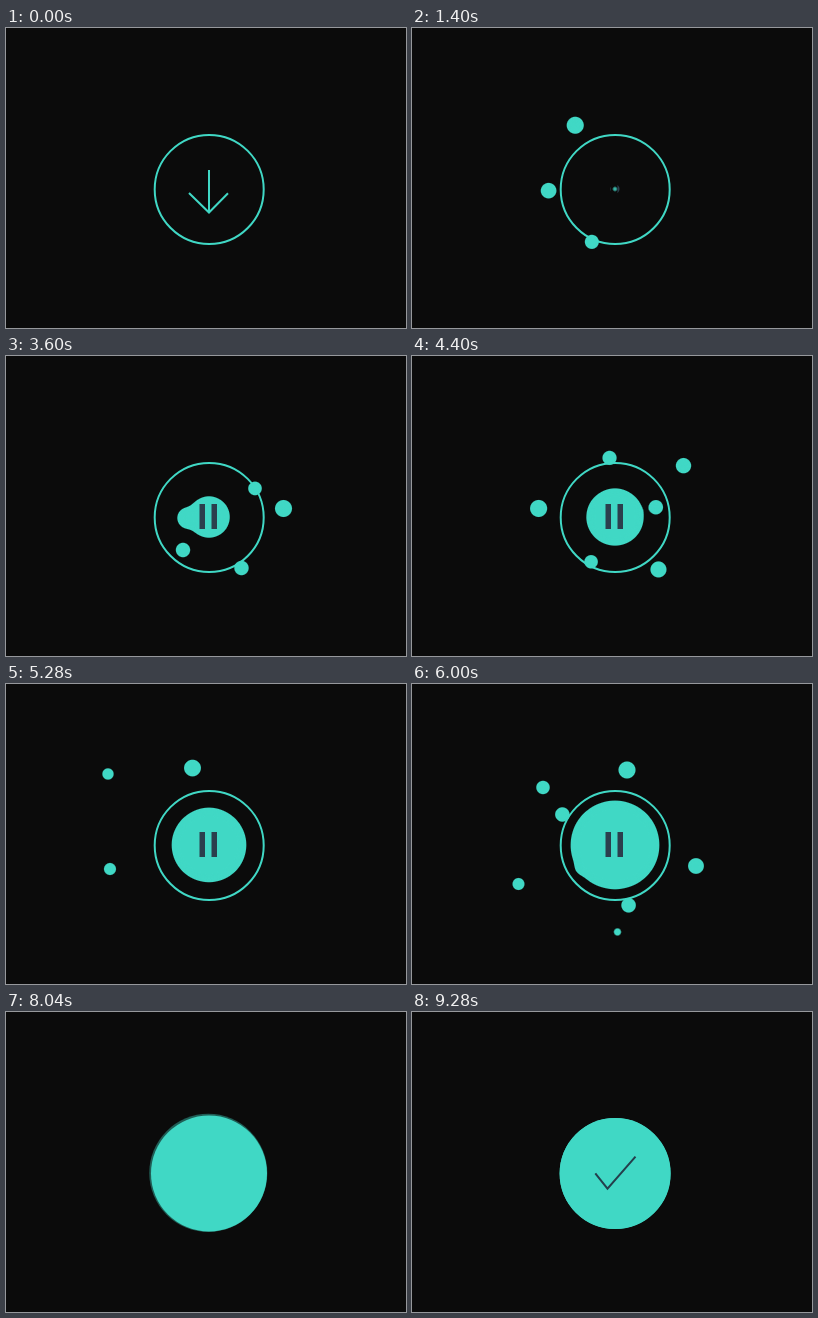
These frames come from a looping animation (400x300 px, 9.6 s). An HTML page:

```html
<!DOCTYPE html>
<html lang="en">
<head>
<meta charset="utf-8">
<title>Download</title>
<style>
  html, body { margin: 0; width: 100%; height: 100%; overflow: hidden; background: #0b0b0b; }
  svg { display: block; width: 100vw; height: 100vh; }
</style>
</head>
<body>
<svg viewBox="0 0 400 300">
  <defs>
    <filter id="goo" filterUnits="userSpaceOnUse" x="0" y="0" width="400" height="300" color-interpolation-filters="sRGB">
      <feGaussianBlur stdDeviation="3.5"/>
      <feColorMatrix values="1 0 0 0 0  0 1 0 0 0  0 0 1 0 0  0 0 0 9 -3.6"/>
    </filter>
    <clipPath id="inside"><circle id="mask" cx="203" cy="161"/></clipPath>
  </defs>
  <circle id="halo" cx="202.3" cy="160.9" fill="#40d8c5"/>
  <circle cx="203.2" cy="161.4" r="54.5" fill="none" stroke="#40d8c5" stroke-width="2"/>
  <path id="arrow" d="M203 142V184.5M183 165L203 184.5L222 165.3" fill="none" stroke="#40d8c5" stroke-width="2"/>
  <circle id="tap" cx="227.5" cy="151.5" fill="#fff"/>
  <g id="drops" fill="#40d8c5" filter="url(#goo)"><circle id="blob" cx="203" cy="161"/></g>
  <circle id="disc" cx="203" cy="161.5" fill="#40d8c5"/>
  <g clip-path="url(#inside)">
    <path id="bars" d="M193.5 148h5.5v25h-5.5zM205.5 148h5.5v25h-5.5z" fill="#2b3f4d"/>
  </g>
  <path id="check" d="M183.3 161.3L195.5 176.7L223.5 144.7" pathLength="1" stroke-dasharray="1 2" fill="none" stroke="#243f4c" stroke-width="2"/>
</svg>
<script>
const LOOP = 9600, STEP = 40, CX = 203, CY = 161, FULL = 55.5;
const SPEED = 0.087;   // pixels per ms towards the centre
const GROW = 14;       // path length spent growing at the birth point
const BIRTH = 86;      // least distance at which a drop is born

const el = id => document.getElementById(id);
const set = (node, attrs) => { for (const k in attrs) node.setAttribute(k, attrs[k]); };
const show = (node, on) => { node.style.display = on ? "" : "none"; };
const clamp = v => Math.max(0, Math.min(1, v));
const part = (t, from, to) => clamp((t - from) / (to - from));
const bell = (x, mid, width) => Math.exp(-(((x - mid) / width) ** 2));

// Drops pulse on the way in and swell just before they merge.
const dropSize = d => 7.8 - 0.011 * d + 2 * bell(d, 76, 14) + 3.5 * bell(d, 24, 12);

const drops = [];

// A drop that passes (x, y) at the given time, spiralling inwards.
function addDrop(time, x, y) {
  const node = document.createElementNS("http://www.w3.org/2000/svg", "circle");
  el("drops").append(node);
  const dist = Math.hypot(x - CX, y - CY), angle = Math.atan2(y - CY, x - CX);
  const birth = Math.max(BIRTH, dist);
  const curl = (0.25 - 0.18 * Math.sin(2 * angle)) * Math.PI / 180;
  drops.push(t => {
    const left = dist + SPEED * (time - t);
    const d = Math.min(left, birth);
    const scale = clamp((birth + GROW - left) / GROW) * clamp(left / 20);
    const a = angle + (d - dist) * curl;
    show(node, scale > 0);
    set(node, { cx: CX + d * Math.cos(a), cy: CY + d * Math.sin(a), r: dropSize(d) * scale });
  });
}

// Drops born one after another around the centre.
function addFan(count, time, from, turn) {
  for (let i = 0; i < count; i++) {
    const a = (from + turn * i) * Math.PI / 180;
    addDrop(time + 100 * i, CX + 96 * Math.cos(a), CY + 96 * Math.sin(a));
  }
}

const addGroup = (time, ...points) => points.forEach(([x, y]) => addDrop(time, x, y));

addFan(3, 960, 130, 55);
addGroup(2360, [226, 117], [176.5, 151.5], [167.3, 196.5], [210.3, 208], [259, 198]);
addGroup(3600, [182, 162], [249, 132.5], [277.5, 152.5], [177, 194], [235.5, 212]);
addFan(6, 3780, 0, 137.5);
addGroup(5280, [186.5, 84], [102, 90], [104, 185]);
addGroup(5400, [202, 275]);
addGroup(6000, [284, 182], [215, 86], [131, 103.5], [106.5, 200]);
addGroup(6060, [205.5, 248]);
addGroup(6720, [278, 165]);

// The blob fills in three even stretches.
const blobSize = t =>
  11 * part(t, 720, 2360) + 10 * part(t, 2360, 3600) + (FULL - 21) * part(t, 3600, 7120);

const spring = u => u > 0 ? 5.2 * Math.exp(-u / 500) * Math.sin(u / 160) : 0;

function draw(t) {
  const size = blobSize(t);

  const press = part(t, 320, 520);
  show(el("tap"), t >= 320 && t < 520);
  set(el("tap"), { r: 8 + 26 * press, opacity: 0.3 * (1 - press) });

  const p = part(t, 720, 1000);
  const s = 1 - p * p * (2.7 * p - 1.7);
  show(el("arrow"), p < 1);
  set(el("arrow"), { transform: `translate(${CX} ${CY}) scale(${s}) translate(${-CX} ${-CY})` });

  show(el("drops"), t >= 720 && t < 7680);
  set(el("blob"), { r: Math.max(0, size - 0.3) });
  drops.forEach(move => move(t));

  set(el("mask"), { r: size });
  set(el("bars"), { opacity: 1 - part(t, 7240, 7480) });

  show(el("disc"), size >= FULL);
  set(el("disc"), { r: FULL + spring(t - 7720) });

  const wave = part(t, 8000, 8680);
  show(el("halo"), wave > 0 && wave < 1);
  set(el("halo"), { r: 55.8 + 55 * wave, opacity: 0.42 * (1 - wave) });

  const drawn = part(t, 8720, 9240);
  show(el("check"), drawn > 0);
  set(el("check"), { "stroke-dashoffset": 1 - drawn });
}

const start = performance.now();
function tick() {
  const t = (performance.now() - start) % LOOP;
  draw(Math.floor(t / STEP) * STEP);
  requestAnimationFrame(tick);
}
tick();
</script>
</body>
</html>
```
